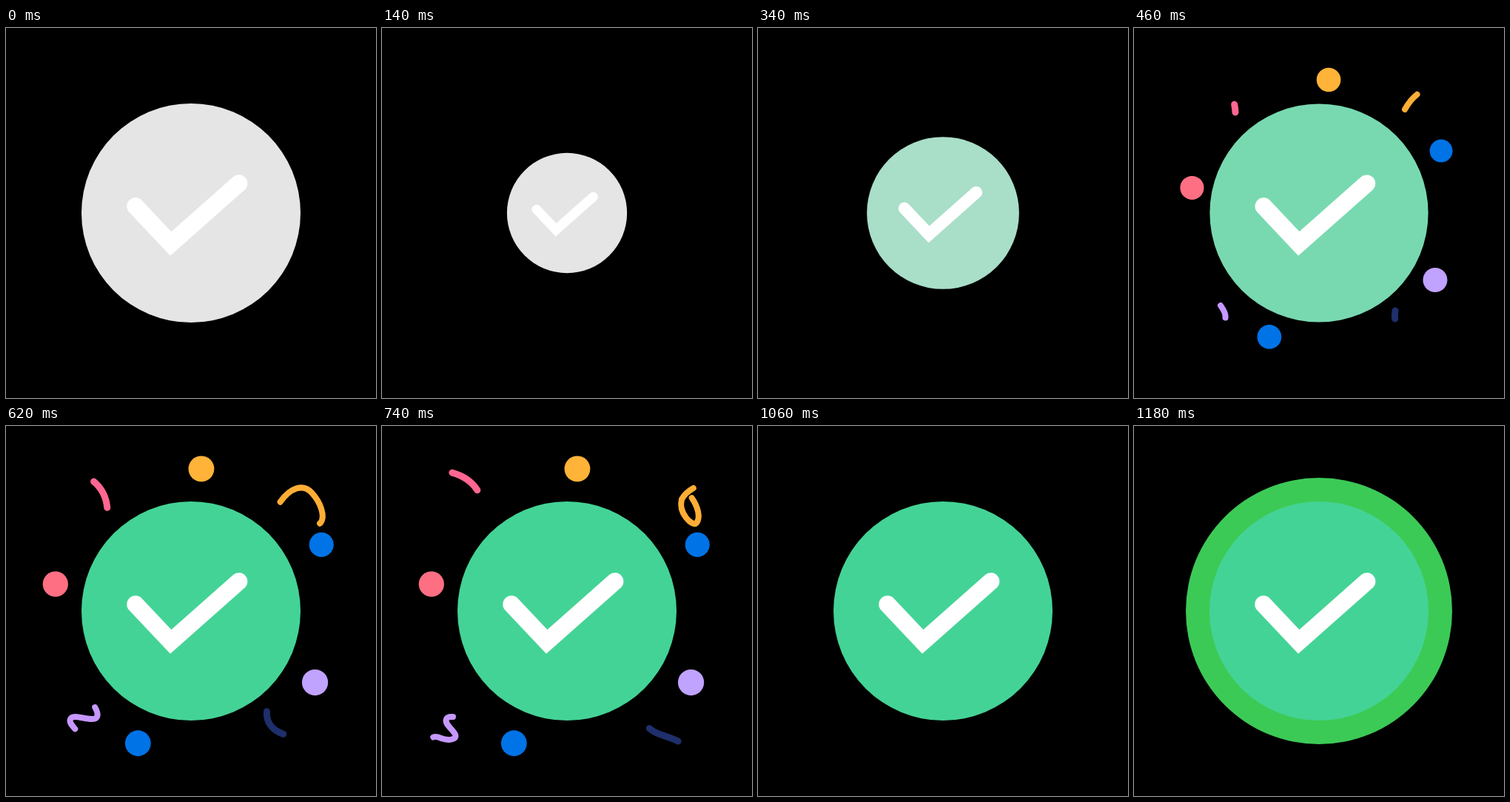
These frames come from a looping animation (500x500 px, 1.2 s). An HTML page:

```html
<!DOCTYPE html>
<html lang="en">
<head>
<meta charset="utf-8">
<title>Success check</title>
<style>
  html, body { margin: 0; height: 100%; overflow: hidden; background: #000; }
  svg { display: block; width: 100%; height: 100%; }
  .streamer { fill: none; stroke-linecap: round; }
</style>
</head>
<body>
<svg viewBox="0 0 500 500">
  <g id="dots">
    <circle cx="14" cy="-193" r="17.5" fill="#ffb338"/>
    <circle cx="177" cy="-90" r="16.6" fill="#0073e6"/>
    <circle cx="168.3" cy="97" r="17.7" fill="#c0a2ff"/>
    <circle cx="-72" cy="179.5" r="17.5" fill="#0073e6"/>
    <circle cx="-184" cy="-36.5" r="17.2" fill="#ff6f83"/>
  </g>
  <path class="streamer" pathLength="1" stroke="#ff6691" stroke-width="9"
    d="M137 114C136 85 115 62 75 60"/>
  <path class="streamer" pathLength="1" stroke="#ffae35" stroke-width="8"
    d="M366 110C380 85 400 76 413 90C425 103 432 122 425 131C420 137 400 118 405 99C413 84 440 70 467 81"/>
  <path class="streamer" pathLength="1" stroke="#c698ff" stroke-width="8"
    d="M117 375C124 385 128 396 116 396C104 396 90 389 87 396C84 403 96 410 99 417C102 425 88 425 80 422C62 414 64 430 68 452"/>
  <path class="streamer" pathLength="1" stroke="#1f2f6b" stroke-width="9"
    d="M353 382C350 398 358 410 374 416C390 422 412 426 410 442"/>
  <circle id="ring" cx="250" cy="250" fill="#3cca56"/>
  <g id="badge">
    <circle id="disc" r="148"/>
    <path d="M-75-9L-27.3 41.5L64.7-40" fill="none" stroke="#fff" stroke-width="23.5" stroke-linecap="round"/>
  </g>
</svg>
<script>
  const LOOP = 1200, STEP = 20;
  const GREY = [229, 229, 229], GREEN = [68, 211, 150];
  const $ = id => document.getElementById(id);
  const streamers = document.querySelectorAll('.streamer');
  const progress = (t, from, to) => Math.min(1, Math.max(0, (t - from) / (to - from)));
  const ease = (t, from, to) => {
    const p = progress(t, from, to);
    return p * p * (3 - 2 * p);
  };
  const approach = ms => 1 - Math.exp(-Math.max(0, ms) / 56);
  const place = (el, scale) => el.setAttribute('transform', `translate(250 250) scale(${scale})`);

  function draw(t) {
    // The badge dips, then springs back while turning green.
    place($('badge'), 1 - 0.61 * (ease(t, 0, 210) - ease(t, 210, 470)));
    const mix = progress(t, 193, 588);
    $('disc').setAttribute('fill', `rgb(${GREY.map((c, i) => Math.round(c + (GREEN[i] - c) * mix))})`);

    // Dots burst out from behind the badge and are pulled back in.
    place($('dots'), approach(t - 309) * approach(1051 - t));

    // Streamers run along their paths, the tail following the head.
    const head = ease(t, 335, 915), tail = ease(t, 564, 1034);
    for (const s of streamers) {
      s.style.display = head - tail > 0.005 ? '' : 'none';
      s.setAttribute('stroke-dasharray', `${head - tail} 2`);
      s.setAttribute('stroke-dashoffset', -tail);
    }

    $('ring').setAttribute('r', t < 1080 ? 0 : 148 + 32 * progress(t, 1080, 1180));
  }

  const start = performance.now();
  function tick() {
    const t = (performance.now() - start) % LOOP;
    draw(Math.floor(t / STEP) * STEP);
    requestAnimationFrame(tick);
  }
  tick();
</script>
</body>
</html>
```
